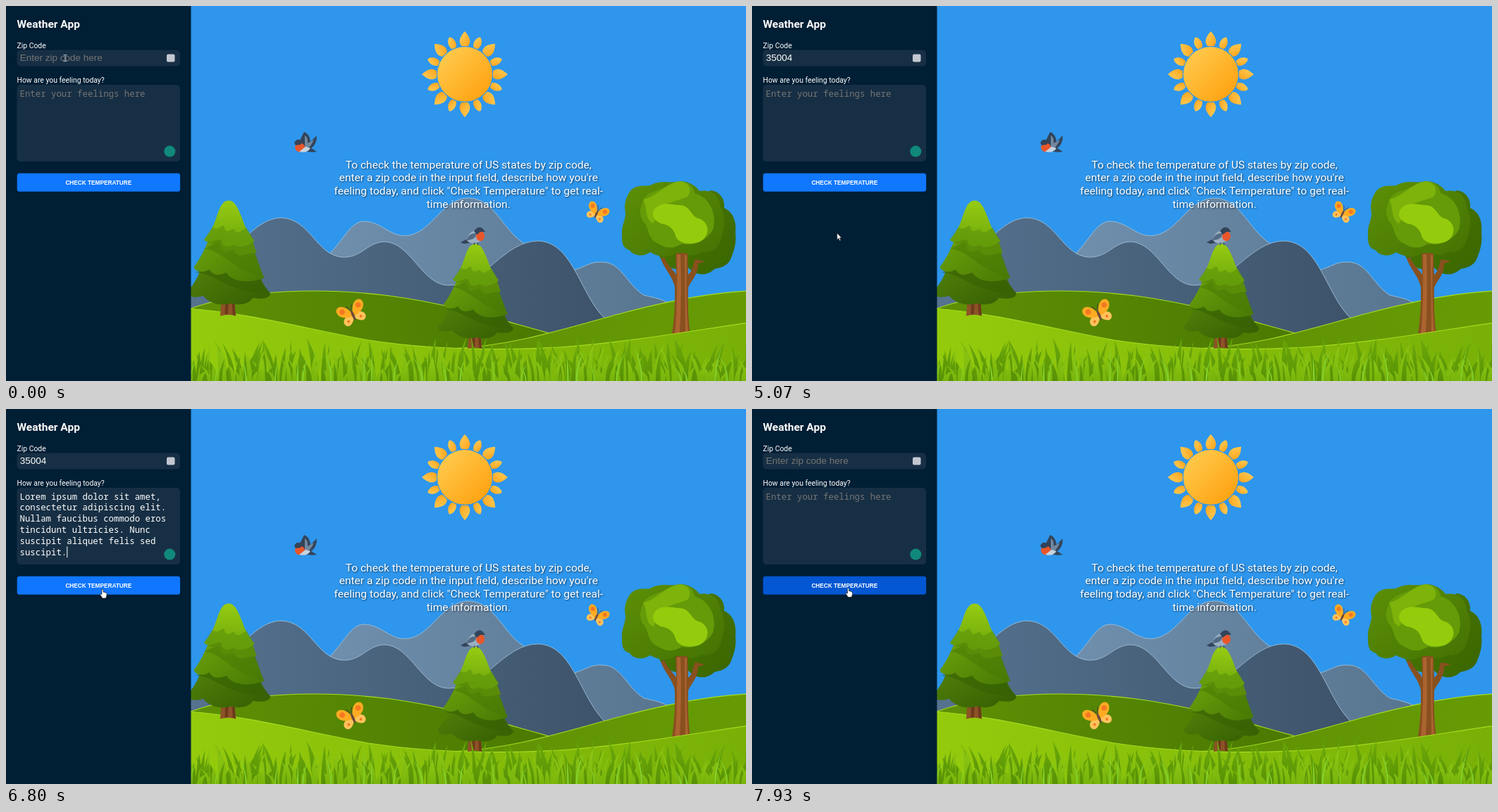
These frames come from a looping animation (1050x533 px, 8000 ms). An HTML page:

```html
<!DOCTYPE html>
<html lang="en">
<head>
<meta charset="utf-8">
<title>Weather App</title>
<style>
html, body { margin: 0; width: 100%; height: 100%; overflow: hidden; background: #001e34; }
svg { display: block; width: 1050px; height: 533px; }
text { fill: #fff; white-space: pre; }
.ui { font-family: Roboto, sans-serif; font-size: 10.4px; }
.title { font: bold 15.5px Roboto, sans-serif; }
.intro { font: 15.55px Roboto, sans-serif; text-anchor: middle; filter: drop-shadow(1px 1px 1px #0009); }
.zip { font: 13.5px "Liberation Sans", Arial, sans-serif; }
.mono { font: 12.37px "Noto Sans Mono", monospace; }
.label { font: bold 8.26px "Liberation Sans", Arial, sans-serif; text-anchor: middle; }
.hint { fill: #757575; }
.edge { stroke: #a9c4da; stroke-width: .8; }
.rim { stroke: #a5dc20; stroke-width: 1.2; }
</style>
</head>
<body>
<svg viewBox="0 0 1050 533">
  <defs id="defs">
    <g id="pine">
      <path fill="#8d5227" d="M-9,125H7L9,149Q0,146 -11,149Z"/>
      <path fill="#6d3a1b" d="M-4,125H0L-1,147H-5ZM4,125H7L9,149L5,147Z"/>
      <path fill="url(#low)" d="M-32,72C-36,93 -44,108 -53,117C-54,126 -41,126 -33,123C-26,132 -12,137 2,133C14,136 26,134 31,126C40,127 52,128 54,120C44,110 37,94 33,72Z"/>
      <path fill="#365f03" opacity=".55" d="M-43,93C-16,94 2,122 53,119C46,112 40,104 36,90L0,78Z"/>
      <path fill="url(#mid)" d="M-23,42C-28,58 -36,74 -45,86C-42,94 -31,93 -25,89C-18,100 -8,95 -3,93C4,105 24,108 46,100C44,97 42,92 40,86C36,74 29,58 25,42Z"/>
      <path fill="#4a7905" opacity=".55" d="M-32,62C-8,64 4,90 46,100C42,90 37,76 32,62L0,48Z"/>
      <path fill="#5a8c08" d="M-30,50C-25,60 -16,53 -12,56C-9,74 1,63 6,64C13,77 24,67 36,68L30,50Z"/>
      <path fill="url(#top)" d="M0,0C-9,0 -12,11 -16,22C-20,34 -25,44 -32,51C-24,58 -15,48 -10,50C-7,64 2,59 6,57C14,63 26,58 33,52C26,44 21,34 17,22C12,10 8,0 0,0Z"/>
      <path fill="#5f950a" opacity=".65" d="M-21,34C-14,41 -9,30 -6,33C-3,46 3,36 7,37C10,45 17,39 23,35L33,52C25,58 14,63 6,57C1,60 -6,63 -10,50C-15,48 -24,58 -32,51Z"/>
    </g>
    <g id="butterfly">
      <path fill="#ffc35c" d="M0,2C-10,0 -19,5 -17,12C-14,21 -3,15 0,6C3,15 14,21 17,12C19,5 10,0 0,2Z"/>
      <path fill="#ffab22" d="M0,4C-2,-10 -13,-20 -20,-13C-25,-4 -14,6 0,5C14,6 25,-4 20,-13C13,-20 2,-10 0,4Z"/>
      <g fill="#f47721"><circle cx="-13" cy="-7" r="4"/><circle cx="13" cy="-7" r="4"/><circle cx="-10" cy="10" r="2"/><circle cx="10" cy="10" r="2"/></g>
      <ellipse cy="4" rx="2" ry="8" fill="#6b4a3a"/>
      <path d="M-1,-4Q-2,-9 -5,-12M1,-4Q2,-9 5,-12" fill="none" stroke="#4d3b36"/>
    </g>
  </defs>

  <rect x="262" width="788" height="533" fill="#2e96ec"/>
  <g id="sun" transform="translate(651 97)"><circle r="39" fill="url(#disc)"/></g>

  <path class="edge" fill="url(#far)" d="M440,368C475,346 485,306 508,306C535,307 545,330 572,326C605,320 620,273 656,273C695,273 706,324 740,340L803,376C825,370 828,363 846,364C873,364 880,395 905,411C917,414 926,415 940,422V480H440Z"/>
  <path class="edge" fill="url(#near)" d="M250,420C300,392 340,302 390,301C432,302 440,355 478,357C505,358 512,336 537,335C575,336 590,397 628,397C680,397 706,334 755,334C806,335 815,415 853,447V490H250Z"/>
  <path class="rim" fill="url(#hill)" d="M262,430C340,402 450,400 545,412C640,425 710,449 775,466V500H262Z"/>
  <path class="rim" fill="url(#slope)" d="M630,487C720,484 800,456 880,435C950,417 1000,408 1052,405V500H630Z"/>

  <g id="tree">
    <path fill="url(#crown)" d="M940,300L1000,262C1014,264 1020,275 1019,287C1031,292 1037,306 1035,322C1037,338 1032,350 1029,358C1024,371 1012,372 1005,374C994,385 978,383 968,372C950,378 932,372 925,350Z"/>
    <path fill="url(#leaf)" d="M874,325C873,312 879,306 879,294C876,281 881,270 885,264C894,252 908,257 914,255C930,246 944,253 957,249C973,250 980,258 984,263C1000,260 1013,269 1014,286C1022,299 1019,319 1015,329C1012,345 1000,352 988,349C975,359 960,352 950,351C937,361 921,354 914,350C902,358 889,354 885,347C873,344 874,333 874,325Z"/>
    <path fill="#659b08" d="M902,282C906,261 929,264 942,253C962,243 976,255 977,266C1000,273 1009,297 1003,318C993,335 976,341 959,338C950,343 940,347 926,338C909,331 913,314 904,306C899,297 899,290 902,282Z"/>
    <path fill="#7db30a" d="M904,275C922,272 935,252 957,249C970,251 974,263 967,271C954,277 944,277 931,285C920,288 926,301 918,309C906,303 911,288 904,275Z"/>
    <path fill="#94cc0d" d="M919,291C928,276 944,283 955,283C970,283 971,296 980,301C997,305 1000,322 989,332C979,340 957,340 951,329C947,314 939,311 929,309C920,305 916,298 919,291Z"/>
    <path fill="#89501f" d="M949,400C946,384 934,374 929,359L934,357C938,369 947,374 951,382L950,352Q960,350 967,352L968,382C976,375 974,366 978,360L992,363L982,366C982,382 973,389 968,400Q967,440 971,466Q958,463 945,467Q950,432 949,400Z"/>
    <path fill="#ab6430" d="M952,353H957Q959,408 956,465L949,466Q953,430 952,353ZM963,354H966Q964,420 968,464L964,465Z"/>
  </g>

  <path class="rim" fill="url(#meadow)" d="M258,430C345,436 430,460 515,475C600,488 695,490 785,485C875,479 970,462 1054,450V536H258Z"/>
  <use href="#pine" transform="translate(316 276.5) scale(1.1)"/>
  <use href="#pine" x="666" y="338"/>
  <g id="grass"></g>

  <g id="flyer">
    <path fill="#33445a" d="M417,191L423,179Q431,182 432,193L441,184Q441,197 433,202L441,207Q430,209 423,205Z"/>
    <path fill="#71889f" d="M424,184Q429,187 428,195L437,190Q432,202 424,205Z"/>
    <ellipse cx="417" cy="201" rx="7" ry="6.5" fill="#e9562a"/>
    <path fill="#33445a" d="M409,194Q414,186 421,193L418,197L411,198Z"/>
    <path fill="#c6d3de" d="M416,207Q427,210 432,202L425,200Z"/>
  </g>
  <g id="percher">
    <path fill="#33445a" d="M645,336L658,329L664,336L650,338Z"/>
    <path fill="#9aafc2" d="M653,332Q659,317 671,319L676,332Q667,340 657,336Z"/>
    <ellipse cx="673" cy="327" rx="6" ry="7" fill="#e9562a"/>
    <path fill="#33445a" d="M664,320Q671,311 677,317L680,321L673,321L668,325Z"/>
    <path fill="#526a83" d="M653,333Q657,322 667,323Q668,332 653,333Z"/>
    <path d="M665,336L664,340M669,336L670,340" stroke="#33445a"/>
  </g>
  <use href="#butterfly" transform="translate(839 293) rotate(26) scale(.74)"/>
  <use href="#butterfly" transform="translate(491 436) rotate(-24) scale(.95)"/>

  <g class="intro">
    <text x="656.3" y="230.8">To check the temperature of US states by zip code,</text>
    <text x="656.3" y="249.4">enter a zip code in the input field, describe how you're</text>
    <text x="656.3" y="267.9">feeling today, and click "Check Temperature" to get real-</text>
    <text x="656.3" y="286.5">time information.</text>
  </g>

  <rect width="262.5" height="533" fill="#001e34"/>
  <text class="title" x="15.5" y="30.6">Weather App</text>
  <text class="ui" x="15.5" y="59.6">Zip Code</text>
  <text class="ui" x="15.5" y="109.2">How are you feeling today?</text>
  <g fill="#172f44">
    <rect x="15.5" y="62.5" width="231.5" height="23" rx="5"/>
    <rect x="15.5" y="112" width="231.5" height="109" rx="5"/>
  </g>
  <rect x="228" y="68.5" width="11.5" height="11" rx="2" fill="#c3c7d0"/>
  <circle cx="232.3" cy="206.6" r="8" fill="#10897a"/>
  <text class="zip" id="zip" x="19.7" y="78.3"></text>
  <g class="mono" id="notes"></g>
  <rect id="caret" width="1" height="15.5" fill="#fff"/>
  <g id="button">
    <rect id="face" x="15.7" y="237.7" width="231.4" height="26" rx="3.5"/>
    <text class="label" x="131.3" y="253.8">CHECK TEMPERATURE</text>
  </g>
  <g id="beam" fill="none" stroke="#b9c2ca"><path d="M-2.5,-4.5H-.7L0,-4L.7,-4.5H2.5M0,-4V4M-2.5,4.5H-.7L0,4L.7,4.5H2.5"/></g>
  <path id="arrow" fill="#fff" stroke="#111" stroke-width=".6" d="M0,0V9.5L2.1,7.5L3.7,11L5.2,10.3L3.7,7H6.5Z"/>
  <path id="hand" fill="#fff" stroke="#111" stroke-width=".7" d="M-1.1,1Q0,-.8 1.1,1V4.3Q2.4,3.6 3,4.7Q4.2,4.2 4.6,5.3Q6,5 6,6.4V9Q5.5,11 4.7,13H-.3Q-2,9.5 -3.7,7.8Q-3,6.2 -1.1,7.6Z"/>
</svg>
<script>
const LOOP = 8000;
const $ = id => document.getElementById(id);
const add = (parent, markup) => parent.insertAdjacentHTML('beforeend', markup);
const during = (t, spans) => spans.some(([from, to]) => t >= from && t < to);
const ramp = (t, from, to) => Math.min(1, Math.max(0, (t - from) / (to - from)));
const ease = p => p * p * (3 - 2 * p);

function gradient(id, from, to, [x1, y1, x2, y2]) {
  add($('defs'), `<linearGradient id="${id}" x1="${x1}" y1="${y1}" x2="${x2}" y2="${y2}">
    <stop stop-color="${from}"/><stop offset="1" stop-color="${to}"/></linearGradient>`);
}
const ACROSS = [0, 0, 1, 0], DOWN = [0, 0, 0, 1], DIAGONAL = [0, 0, 1, 1];
gradient('disc', '#ffcf55', '#ff9d08', DIAGONAL);
gradient('gold', '#ffd05c', '#ffa31a', DIAGONAL);
gradient('far', '#7090ae', '#58758f', ACROSS);
gradient('near', '#567390', '#3d536a', ACROSS);
gradient('hill', '#5e9005', '#4a7901', ACROSS);
gradient('slope', '#5d9103', '#679b05', ACROSS);
gradient('meadow', '#94cb0c', '#78b007', ACROSS);
gradient('crown', '#4c7b04', '#396500', DIAGONAL);
gradient('leaf', '#5d9006', '#447203', DIAGONAL);
gradient('low', '#55860a', '#345d03', DIAGONAL);
gradient('mid', '#6ea40b', '#487905', DIAGONAL);
gradient('top', '#96cc12', '#6da60b', DOWN);
gradient('blade', '#6dab0a', '#568f05', DOWN);
gradient('bright', '#90c914', '#76b20b', DOWN);

for (let i = 0; i < 16; i++) {
  const [tip, w] = i % 2 ? [-57, 6.5] : [-61, 9];
  add($('sun'), `<path fill="url(#gold)" transform="rotate(${i * 22.5})"
    d="M0,${tip}C${w * .6},-55 ${w * 1.2},-47 ${w * .5},-40H${-w * .5}C${-w * 1.2},-47 ${-w * .6},-55 0,${tip}Z"/>`);
}

let seed = 11;
const random = () => (seed = seed * 16807 % 2147483647) / 2147483647;

function blades(count, fill, minHeight, spread, width) {
  let d = '';
  for (let i = 0; i < count; i++) {
    const x = 258 + (i + random()) * 796 / count;
    const top = 533 - minHeight - spread * random();
    const tip = x + (random() - .5) * 30;
    const w = width * (.7 + random() * .6);
    const bend = (top + 533) / 2 - 3;
    d += `M${x - w},535Q${x - w},${bend} ${tip},${top}Q${x + w},${bend} ${x + w},535Z`;
  }
  add($('grass'), `<path fill="${fill}" d="${d}"/>`);
}
blades(95, 'url(#blade)', 28, 36, 4);
blades(80, 'url(#bright)', 20, 34, 4);
blades(60, 'url(#blade)', 18, 36, 3.2);
blades(60, 'url(#bright)', 10, 26, 3.2);
blades(25, '#83d12d', 15, 38, 1);

const LOREM = ['Lorem ipsum dolor sit amet,', 'consectetur adipiscing elit.', 'Nullam faucibus commodo eros',
  'tincidunt ultricies. Nunc', 'suscipit aliquet felis sed', 'suscipit.'];
const PASTE_ZIP = 930, PASTE_NOTES = 6400, SUBMIT = 7470;
const lines = (rows, cls = '') => rows.map((row, i) =>
  `<text class="${cls}" x="19.5" y="${128.6 + i * 15.8}">${row}</text>`).join('');

// Caret place followed by the spans in which it is lit
const CARETS = [
  [19.2, 66, [[70, 670]]],
  [57, 66, [[930, 1470], [2000, 2530], [3070, 3200]]],
  [19.2, 116, [[5670, 6200]]],
  [86.3, 195.5, [[6400, 6930]]]
];
// Pointer stops: time, x, y
const STOPS = [[5070, 120, 323], [5230, 232, 268], [5370, 286, 202], [5530, 205, 165], [5730, 103, 160],
  [6430, 103, 160], [6600, 115, 205], [6800, 137, 256], [7200, 137, 256], [7270, 136.5, 254.5], [LOOP, 136.5, 254.5]];

function pointer(t) {
  if (t < 1400) return [84, 74];
  if (t < STOPS[0][0]) return null;
  const i = STOPS.findIndex(stop => stop[0] > t);
  const [t0, x0, y0] = STOPS[i - 1], [t1, x1, y1] = STOPS[i];
  const p = ramp(t, t0, t1);
  return [x0 + (x1 - x0) * p, y0 + (y1 - y0) * p];
}

function drawPointer(t) {
  const at = pointer(t);
  let kind = '';
  if (at) {
    const [x, y] = at, inside = x > 16 && x < 247;
    kind = inside && y > 238 && y < 264 ? 'hand'
      : inside && (y > 112 && y < 221 || y > 62 && y < 86) ? 'beam' : 'arrow';
    $(kind).setAttribute('transform', `translate(${x} ${y})`);
  }
  for (const id of ['beam', 'arrow', 'hand']) $(id).style.display = id === kind ? '' : 'none';
}

function drawForm(t) {
  const hasZip = during(t, [[PASTE_ZIP, SUBMIT]]);
  $('zip').textContent = hasZip ? '35004' : 'Enter zip code here';
  $('zip').classList.toggle('hint', !hasZip);
  const notes = during(t, [[PASTE_NOTES, SUBMIT]]) ? lines(LOREM) : lines(['Enter your feelings here'], 'hint');
  if ($('notes').dataset.rows !== notes) $('notes').innerHTML = $('notes').dataset.rows = notes;

  const caret = CARETS.find(c => during(t, c[2]));
  $('caret').style.display = caret ? '' : 'none';
  if (caret) {
    $('caret').setAttribute('x', caret[0]);
    $('caret').setAttribute('y', caret[1]);
  }
}

function drawButton(t) {
  const hover = ease(ramp(t, 6760, 7130));
  const press = ramp(t, 7230, 7330) - ease(ramp(t, SUBMIT, 7730));
  const mix = (a, b) => Math.round(a + (b - a) * hover);
  $('face').setAttribute('fill', `rgb(${mix(16, 3)},${mix(119, 87)},${mix(255, 211)})`);
  $('face').style.filter = press > 0 ? `drop-shadow(0 3px 3px rgba(0,0,0,${.25 * press}))` : 'none';
  $('button').setAttribute('transform', `translate(131.25 250.85) scale(${1 - .03 * press}) translate(-131.25 -250.85)`);
}

function frame(now) {
  const t = now % LOOP;
  drawForm(t);
  drawButton(t);
  drawPointer(t);
  requestAnimationFrame(frame);
}
frame(0);
</script>
</body>
</html>
```
